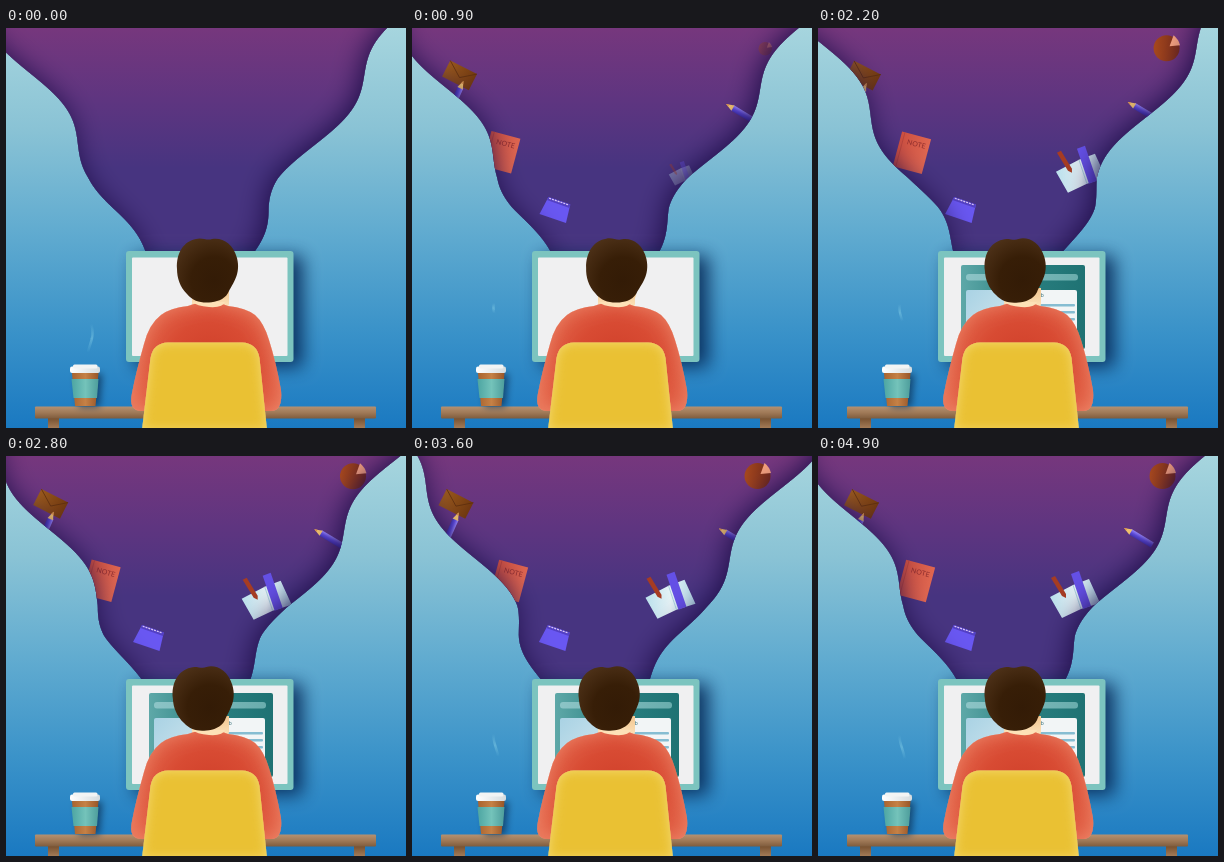
These frames come from a looping animation (400x400 px, 5 s). An HTML page with a canvas:

```html
<!DOCTYPE html>
<html>
<head>
<meta charset="utf-8">
<style>
html, body { margin: 0; width: 100%; height: 100%; overflow: hidden; }
canvas { display: block; }
</style>
</head>
<body>
<canvas id="stage" width="400" height="400"></canvas>
<script>
const c = document.getElementById('stage').getContext('2d');
const TAU = Math.PI * 2, LOOP = 5;
const clamp = v => Math.max(0, Math.min(1, v));
const smooth = u => u * u * (3 - 2 * u);
const mix = (a, b, u) => a + (b - a) * u;

function stops(g, colors) {
  colors.forEach((k, i) => g.addColorStop(i / (colors.length - 1), k));
  return g;
}
const grad = (x0, y0, x1, y1, ...colors) => stops(c.createLinearGradient(x0, y0, x1, y1), colors);
const radial = (x, y, r, ...colors) => stops(c.createRadialGradient(x, y, 0, x, y, r), colors);

function box(x, y, w, h, fill, r = 0) {
  c.fillStyle = fill;
  c.beginPath();
  c.roundRect(x, y, w, h, r);
  c.fill();
}
function shape(d, fill) {
  c.fillStyle = fill;
  c.fill(new Path2D(d));
}
function line(d, color, width) {
  c.strokeStyle = color;
  c.lineWidth = width;
  c.stroke(new Path2D(d));
}
function shadow(color, blur, x = 0, y = 0) {
  c.shadowColor = color;
  c.shadowBlur = blur;
  c.shadowOffsetX = x;
  c.shadowOffsetY = y;
}
// Soft band of colour along the inside of a path
function innerGlow(path, color, blur, x = 0, y = 0) {
  const outside = new Path2D('M-200 -200H600V600H-200Z');
  outside.addPath(path);
  c.save();
  c.clip(path);
  shadow(color, blur, x, y);
  c.fillStyle = color;
  c.fill(outside, 'evenodd');
  c.restore();
}

// Two edges carrying a wave that climbs once per second
const WAVE = 142;
const bend = y => 0.15 * Math.max(0, y - 150);
const amp = y => Math.min(12.5, 6 + (223 - y) * 0.15);
const wave = (y, y0, t) => amp(y) * Math.sin(TAU * ((y - y0) / WAVE + t));
const leftEdge = (y, t) => -6.7 + 0.677 * y - bend(y) - wave(y, 116, t);
const rightEdge = (y, t) => 392 - 0.717 * y + bend(y) + wave(y, 47, t);

function cloudPath(t) {
  const p = new Path2D();
  for (let y = -40; y <= 250; y += 3) p.lineTo(leftEdge(y, t), y);
  for (let y = 250; y >= -40; y -= 3) p.lineTo(rightEdge(y, t), y);
  p.closePath();
  return p;
}

function pencil() {
  box(7, -3, 26, 6, grad(0, -3, 0, 3, '#9a8aff', '#5f4de0', '#4234b4'));
  shape('M0 0L8 -3V3Z', '#f2c46c');
  shape('M0 0L3 -1.2V1.2Z', '#d98f4a');
}
function envelope() {
  box(-15, -9, 30, 18, grad(-15, 0, 15, 0, '#9c5a1b', '#70380f'));
  line('M-15 -9L1 2L15 -9', '#5c2d0e', 0.7);
}
function note() {
  box(-15, -18, 30, 36, grad(-15, 0, 15, 0, '#cf5040', '#df6650'));
  line('M-12 -18V18', '#b9443a', 0.8);
  c.fillStyle = '#8e2c2c';
  c.font = '7px Lato, sans-serif';
  c.textAlign = 'center';
  c.fillText('NOTE', 2, -7);
}
function tray() {
  shape('M-11 -10H12L14 9H-14Z', '#6957f2');
  shape('M-11 -10H12L12.4 -6.5H-11.6Z', '#5340c4');
  c.setLineDash([2, 1]);
  line('M-10 -9H11', '#d7c3f4', 1.2);
  c.setLineDash([]);
}
function book() {
  shape('M-25 1L-2 -11L14 -17L25 7L6 13L-13 22Z', grad(-25, 0, 25, 0, '#b9dfec', '#e6f3f6', '#b4dbe8'));
  line('M-2 -11L6 13', '#9cc8d8', 0.8);
  shape('M-4 -22L4 -25L16 10L8 13Z', '#6450e6');
  shape('M-24 -18L-20 -20L-9 -2L-9 2L-13 0Z', '#a63c22');
}
function pie() {
  c.fillStyle = grad(-12, 0, 12, 0, '#a5471d', '#782c18');
  c.beginPath();
  c.arc(0, 0, 13, 0, TAU);
  c.fill();
  shape('M3 -2L7 -13Q12 -9 13.5 -3Z', '#f4a17d');
}

// draw, final x and y, drift, angle in degrees, appearance time
const items = [
  [envelope, 43.5, 48, -6, 1, 27, 0.4],
  [pencil, 46, 57, -8, 6, 114, 0.5],
  [note, 98, 125, 13, 1, 15, 0.5],
  [tray, 143, 182, -1, 0, 19, 0.3],
  [book, 257, 140, -19, -9, 0, 0.77],
  [pencil, 306, 72, -12, -6, 31, 0.55],
  [pie, 344.5, 20, -13, -1, 0, 0.77]
];

function drawItems(t) {
  const rest = (1 - t / LOOP) ** 2;
  for (const [draw, x, y, dx, dy, deg, start] of items) {
    const u = smooth(clamp((t - start) / 0.3));
    if (!u) continue;
    c.save();
    c.translate(x - dx * rest, y - dy * rest);
    c.rotate(deg * TAU / 360);
    c.scale(mix(0.2, 1, u), mix(0.2, 1, u));
    c.globalAlpha = u;
    draw();
    c.restore();
  }
}

function drawCloud(t) {
  const p = cloudPath(t);
  c.save();
  c.clip(p);
  box(0, 0, 400, 260, grad(0, 0, 0, 140, '#76377d', '#5f3580', '#473480'));
  drawItems(t);
  c.restore();
  innerGlow(p, '#1d0c48', 28, -3, 0);
}

function drawMonitor(t) {
  c.save();
  shadow('rgba(6,40,85,.9)', 18, 9, 5);
  box(120, 223, 167.5, 111, '#7cc4bf', 3);
  c.restore();
  box(126, 229.5, 155.5, 98.5, '#f0f0f1', 1);
  if (t < 2) return;
  box(143, 237, 124, 84, grad(143, 0, 267, 0, '#5ea8a8', '#2a8081', '#1f7273'), 2);
  box(148, 246, 112, 6.5, grad(148, 0, 260, 0, '#8cc4c6', '#69adad'), 3);
  box(148, 262, 52, 52, grad(148, 262, 200, 310, '#a9d2e4', '#d6e9ef'), 2);
  box(203, 262, 56, 52, '#f2f5f6', 2);
  for (const y of [276, 283, 290]) box(212, y, 45, 2.5, '#86bdd2', 1);
  c.fillStyle = '#356f78';
  c.font = '5px Inter, sans-serif';
  c.textAlign = 'left';
  c.fillText('Aa b', 215, 269);
}

function drawSteam(t) {
  for (const start of [-0.4, 1.2, 2.75, 4.1]) {
    const u = (t - start) / 1.35;
    if (u < 0.05 || u >= 1) continue;
    const top = 335 - 60 * (1 - (1 - u) ** 3), bottom = 335 - 50 * smooth(u);
    c.beginPath();
    for (let y = top; y <= bottom; y++) c.lineTo(84 + 2.5 * Math.sin((y - 292) / 8), y);
    c.strokeStyle = grad(0, top, 0, bottom, 'rgba(130,205,230,0)', 'rgba(130,205,230,.5)', 'rgba(130,205,230,0)');
    c.lineWidth = 2.5;
    c.stroke();
  }
}

function drawDesk() {
  for (const x of [42, 348]) box(x, 390, 11, 10, grad(0, 390, 0, 400, '#76502f', '#a37b57'));
  box(29, 378.5, 341, 12, grad(0, 378, 0, 391, '#b69373', '#a07a58', '#7d5a3b'), 1);
  c.save();
  shadow('rgba(10,45,80,.7)', 7, 4, 1);
  shape('M66 345H92.5L89.5 378H69Z', grad(66, 0, 93, 0, '#a9642f', '#c58146', '#965427'));
  c.restore();
  shape('M65.5 351H92.5L91 370H67.5Z', grad(66, 0, 93, 0, '#4ea6a3', '#74c3ba', '#4c9c9b'));
  box(64, 338.5, 30, 6.5, grad(64, 0, 94, 0, '#ffffff', '#d5dcdf'), 2);
  box(67, 336.5, 24.5, 4, '#f2f4f4', 1.5);
}

function headAngle(t) {
  return t < 0.8 ? mix(0, 2, smooth(t / 0.8)) : mix(2, -2.7, smooth(clamp((t - 0.9) / 1.3)));
}

const BODY = new Path2D('M182 278Q203 270 222 278Q240 280 249 287Q258 295 263 312Q270 334 275 362Q277 383 265 383H136Q122 383 126 365Q130 344 138 316Q143 296 155 287Q164 280 182 278Z');
const CHAIR = new Path2D('M136 402L144.5 330Q147 315 162 314.5H236Q251 315 253.5 330L261 402Z');
const HAIR = new Path2D('M171 241C170 225 178 213 190 211C196 209 201 213 206 211C216 209 227 215 231 230C235 246 227 255 222 265C218 272 210 274 203 274.5C194 275 187 273 181 266C174 259 171 250 171 241Z');

function drawPerson(t) {
  shape('M186 260H223V276Q222 284 204 284Q188 284 186 276Z', grad(0, 262, 0, 282, '#f3c994', '#fde6c1'));
  c.fillStyle = radial(204, 335, 82, '#cf3f29', '#d84b33', '#e5694d');
  c.fill(BODY);
  innerGlow(BODY, 'rgba(240,150,122,.75)', 16);
  shape('M187 274H219Q217 280 203 279Q190 278 187 274Z', '#fde1b7');
  c.save();
  c.translate(202, 330);
  c.rotate(headAngle(t) * TAU / 360);
  c.translate(-202, -330);
  shape('M218 261Q224 262 221 269Q218 273 215 269Z', '#f6cf9d');
  c.fillStyle = radial(208, 252, 46, '#331b06', '#371e07', '#4d3118');
  c.fill(HAIR);
  c.restore();
  c.fillStyle = '#eac133';
  c.fill(CHAIR);
  innerGlow(CHAIR, 'rgba(250,232,150,.8)', 11);
}

function render(t) {
  box(0, 0, 400, 400, grad(0, 0, 0, 400, '#a6d5de', '#8ac3d5', '#62acd0', '#3b93c9', '#1a79c1'));
  drawCloud(t);
  drawMonitor(t);
  drawSteam(t);
  drawDesk();
  drawPerson(t);
}

const begin = performance.now();
function tick() {
  const ms = Math.max(0, performance.now() - begin) % (LOOP * 1000);
  render(Math.floor(ms / 100) / 10);
  requestAnimationFrame(tick);
}
tick();
</script>
</body>
</html>
```
